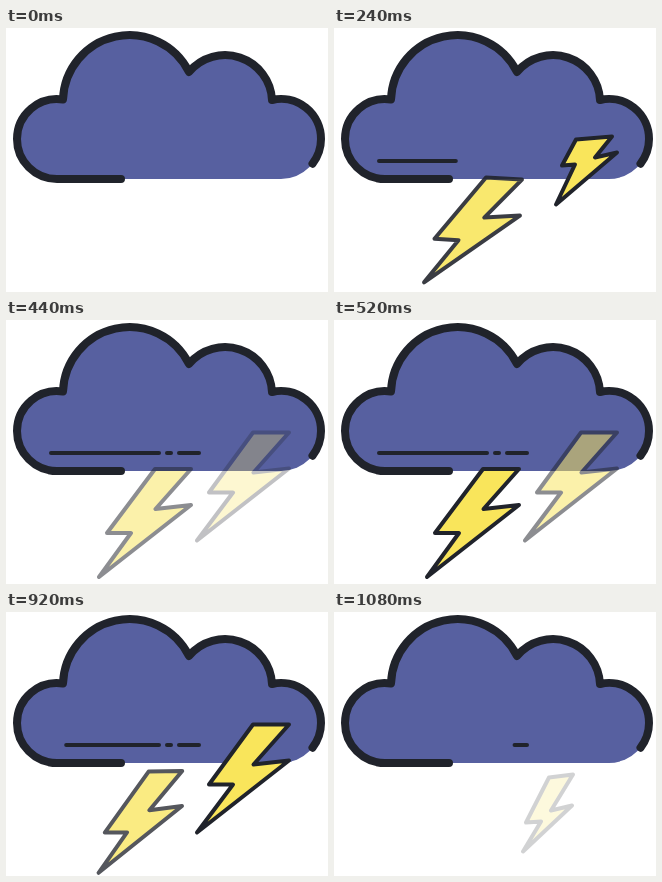
An HTML page that plays this animation: 322 px wide and 264 px high, repeating every 1.12 s.

```html
<!DOCTYPE html>
<html lang="en">
<head>
<meta charset="utf-8">
<title>Thunder cloud</title>
<style>
  html, body { margin: 0; width: 100%; height: 100%; overflow: hidden; background: #fff; }
  svg { display: block; width: 100vw; height: 100vh; }
  .ink { stroke: #20232b; stroke-width: 4; stroke-linecap: round; stroke-linejoin: round; }
</style>
</head>
<body>
<svg viewBox="0 0 322 264">
  <path fill="#5760a0" d="M51 151A40 40 0 0 1 11 111A40 40 0 0 1 57 71.5A66.5 66.5 0 0 1 183 44A47 47 0 0 1 266 72A40 40 0 0 1 315 111A40 40 0 0 1 275 151Z"/>
  <path class="ink" fill="none" style="stroke-width:8"
    d="M115 151H51A40 40 0 0 1 11 111A40 40 0 0 1 57 71.5A66.5 66.5 0 0 1 183 44A47 47 0 0 1 266 72A40 40 0 0 1 315 111A40 40 0 0 1 306.5 135.7"/>
  <g id="dashes" class="ink"></g>
  <g id="bolts" class="ink" fill="#f9e55b"></g>
</svg>
<script>
const LOOP = 1120, STEP = 40, ENTER = 160, LEAVE = 920;
const NS = 'http://www.w3.org/2000/svg';

const make = (tag, parent) =>
  document.getElementById(parent).appendChild(document.createElementNS(NS, tag));
const clamp = (v, low = 0, high = 1) => Math.min(high, Math.max(low, v));
const lerp = (a, b, k) => a + (b - a) * k;
const outline = text => text.split(' ').map(pair => pair.split(',').map(Number));
const morph = (from, to, k) => from.map(([x, y], i) => [lerp(x, to[i][0], k), lerp(y, to[i][1], k)]);

// Key outlines, relative to the upper left corner of the resting bolt
const full = outline('0,0 36,0 .5,40 36,36 -56,108 -24,64 -48,64');
const compact = outline('-5,-1 31,-4 14,17 36,12 -25,64 -10,28 -23,29');
const sunken = outline('-32,53 -8,50 -30,86 -9,81 -58,127 -44,101 -59,102');

// notch slides the left corners up along the bolt's edge
const bolts = [
  { x: 149, y: 149, notch: 0, delay: 0 },
  { x: 247, y: 112.5, notch: 4, delay: 80 }
].map(b => ({ ...b, el: make('polygon', 'bolts') }));

const lineStart = 45, lineEnd = 193;
const dashes = [[45, 153], [161, 165], [173, 193]]
  .map(([from, to]) => ({ from, to, el: make('line', 'dashes') }));

function entering(t) {
  const n = t / STEP;
  return {
    shape: morph(full, compact, clamp(1 - n / 2) ** 1.7),
    tilt: n < 4 ? 3.2 * Math.sin(Math.PI * n / 4) ** 2 : 0,
    opacity: Math.min(1, Math.max(1 - .029 * n * n, .27 * (n - 5.1)))
  };
}

function leaving(t) {
  const k = t / (2 * STEP);
  return { shape: morph(full, sunken, lerp(.2, 1, k)), tilt: 0, opacity: lerp(.76, .2, k) };
}

function drawBolt({ el, x, y, notch, delay }, t) {
  const sinceEnter = t - ENTER - delay, sinceLeave = t - LEAVE - delay;
  const visible = sinceEnter >= 0 && sinceLeave <= 2 * STEP;
  el.style.display = visible ? '' : 'none';
  if (!visible) return;

  const { shape, tilt, opacity } = sinceLeave < 0 ? entering(sinceEnter) : leaving(sinceLeave);
  const points = shape.map(([px, py], i) => i > 4 ? [px + notch, py - notch] : [px, py]);
  el.setAttribute('points', points.join(' '));
  el.setAttribute('transform', `translate(${x} ${y}) rotate(${tilt} -9 54)`);
  el.setAttribute('opacity', opacity);
}

// Soft ease in and out, already under way at its first step
function sweep(t) {
  if (t < 0) return lineStart;
  const k = clamp((t + 43) / 240);
  return lerp(lineStart, lineEnd, k - .085 * Math.sin(2 * Math.PI * k));
}

function drawDash({ el, from, to }, t) {
  const left = Math.max(from, sweep(t - LEAVE));
  const right = Math.min(to, sweep(t - ENTER));
  el.style.display = right > left ? '' : 'none';
  const place = { x1: left, x2: right, y1: 133, y2: 133 };
  for (const key in place) el.setAttribute(key, place[key]);
}

function draw(t) {
  bolts.forEach(b => drawBolt(b, t));
  dashes.forEach(d => drawDash(d, t));
}

const began = performance.now();
function tick() {
  const t = (performance.now() - began) % LOOP;
  draw(Math.floor(t / STEP) * STEP);
  requestAnimationFrame(tick);
}
tick();
</script>
</body>
</html>
```
